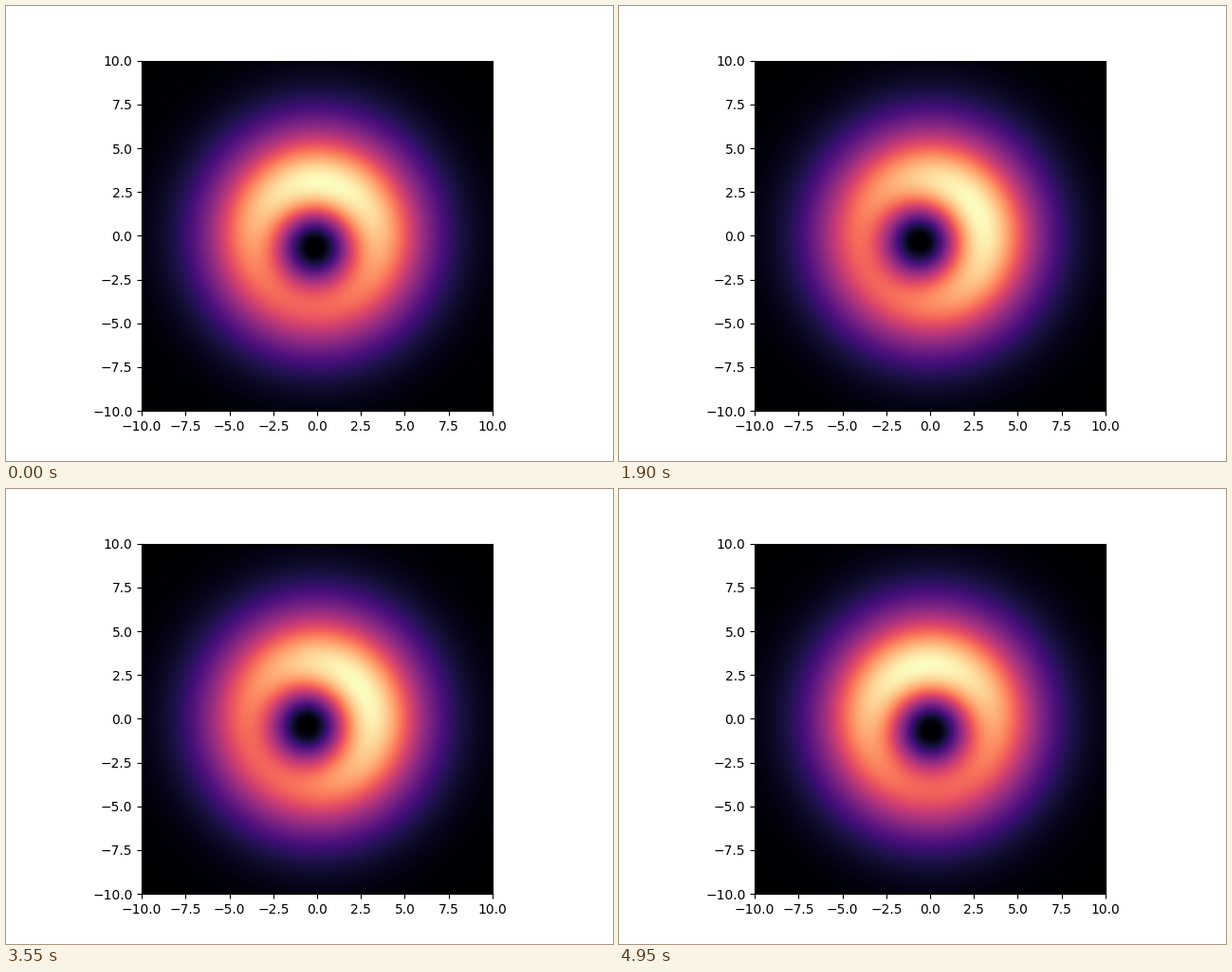
Recreate the animation shown at these times as a matplotlib script. Size 640x480 px, loop 5 s.

```python
import numpy as np
import matplotlib.pyplot as plt
from matplotlib.animation import FuncAnimation

FRAMES = 100
INTERVAL = 50      # ms
HALF = 10          # half width of the view
DISK = 25.0        # squared width of the glowing disk
SHADOW = 7.0       # squared width of the dark core
OFFSET = 0.5       # distance of the core from the centre
STEP = 0.1875      # radians per frame, clockwise

axis = np.linspace(-HALF, HALF, 400)
X, Y = np.meshgrid(axis, axis)


def bump(x, y, width):
    return np.exp(-((X - x) ** 2 + (Y - y) ** 2) / width)


disk = bump(0, 0, DISK)


def intensity(i):
    phase = STEP * (i + 1)
    x, y = -OFFSET * np.sin(phase), -OFFSET * np.cos(phase)
    return disk - bump(x, y, SHADOW)


fig, ax = plt.subplots(figsize=(6.4, 4.8), dpi=100)
first = intensity(0)
image = ax.imshow(first, cmap="magma", origin="lower", vmin=0, vmax=first.max(),
                  extent=(-HALF, HALF, -HALF, HALF), interpolation="bilinear")
ticks = np.arange(-HALF, HALF + 1, 2.5)
ax.set_xticks(ticks)
ax.set_yticks(ticks)


def update(i):
    image.set_data(intensity(i))
    return [image]


anim = FuncAnimation(fig, update, frames=FRAMES, interval=INTERVAL,
                     repeat=True, repeat_delay=0)
plt.show()
```
